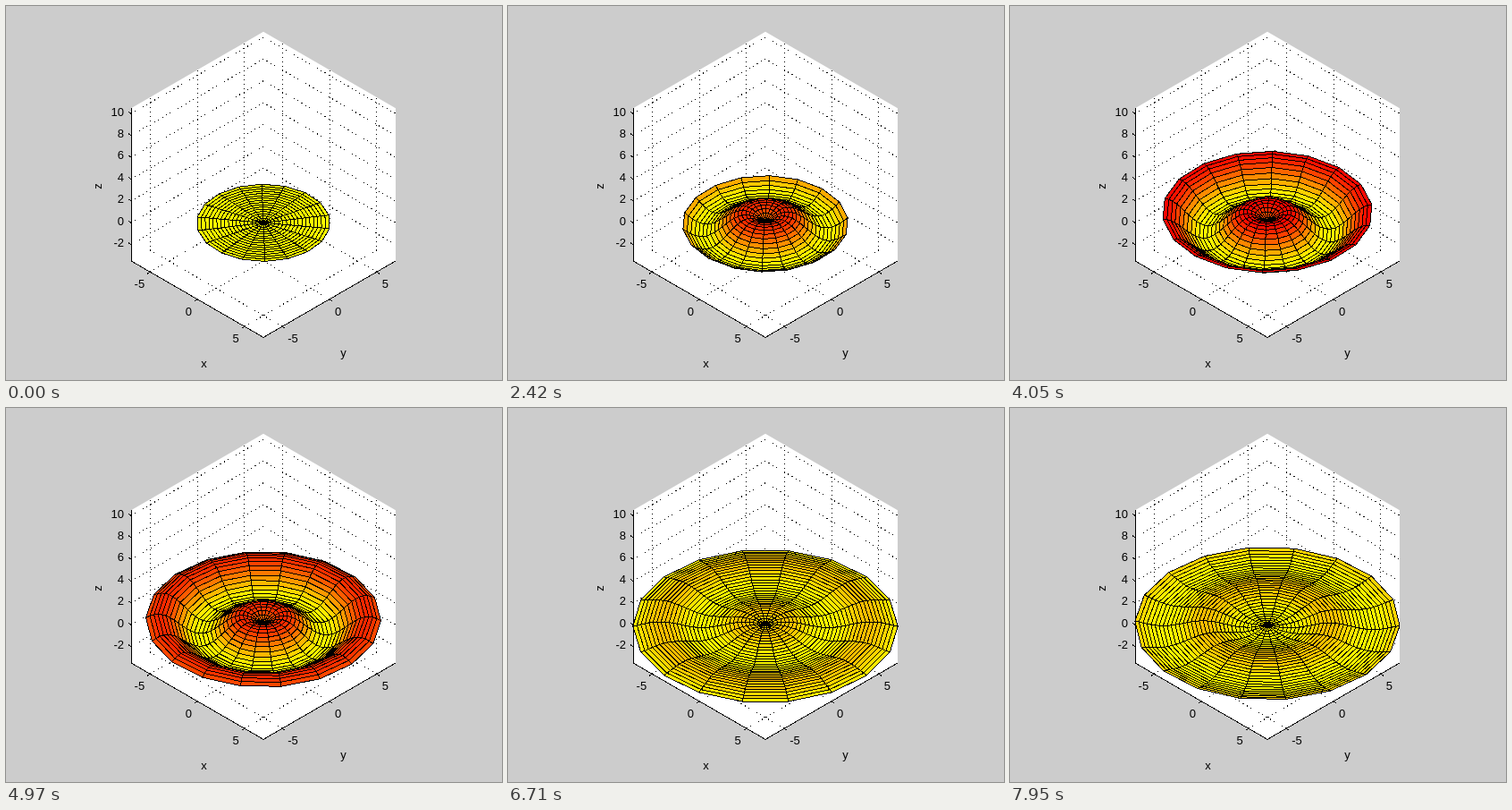
An HTML page that plays this animation: 555x418 px, repeating every 8000 ms.

```html
<!DOCTYPE html>
<html lang="en">
<head>
<meta charset="utf-8">
<title>Rippling disc</title>
<style>
html, body { margin: 0; width: 100%; height: 100%; overflow: hidden; background: #ccc; }
svg { display: block; width: 100vw; height: 100vh; }
text { font: 13px "Liberation Sans", Arial, sans-serif; }
.line { fill: none; stroke: #000; shape-rendering: crispEdges; }
.grid { stroke-dasharray: 1 4; }
#surface { stroke: #000; stroke-width: 1; stroke-linejoin: bevel; shape-rendering: crispEdges; }
</style>
</head>
<body>
<svg viewBox="0 0 555 418">
  <rect width="555" height="418" fill="#ccc"/>
  <g id="axes"></g>
  <g id="surface"></g>
</svg>
<script>
const LOOP = 8000, SECTORS = 18, STEP = 0.3;
const CX = 288, CY = 242.3, UNIT = 14.95, SIN_EL = 0.577, COS_EL = 0.816;
const LIM = 7, Z_MIN = -3.5, Z_MAX = 10.5;
// Mesh rotation in degrees, as [tick, angle]
const TURN = [[0, -1.5], [17, 45], [31, 83.1], [52, 142.9], [76, 199.6], [87, 230], [104, 274.4]];

// u: right on screen, v: towards the viewer along the floor
const project = (u, v, z) => [CX + UNIT * u, CY + UNIT * (SIN_EL * v - COS_EL * z)];
const world = (x, y, z) => project((x + y) * Math.SQRT1_2, (x - y) * Math.SQRT1_2, z);
const coords = p => p[0].toFixed(1) + ',' + p[1].toFixed(1);
const poly = (...pts) => pts.map(coords).join(' ');
const line = (cls, ...pts) => `<polyline class="line ${cls}" points="${poly(...pts)}"/>`;
const label = (s, x, y, anchor = 'middle', extra = '') =>
  `<text x="${x}" y="${y}" text-anchor="${anchor}" ${extra}>${s}</text>`;
const tick = ([x, y], dx, dy) => line('', [x, y], [x + dx, y + dy]);

function drawAxes() {
  const L = LIM, left = world(-L, -L, Z_MIN), front = world(L, -L, Z_MIN), right = world(L, L, Z_MIN);
  const leftTop = world(-L, -L, Z_MAX);
  const hull = [left, front, right, world(L, L, Z_MAX), world(-L, L, Z_MAX), leftTop];
  let out = `<polygon fill="#fff" points="${poly(...hull)}"/>`;
  for (const k of [-5, 0, 5]) {
    out += line('grid', world(k, -L, Z_MIN), world(k, L, Z_MIN), world(k, L, Z_MAX));
    out += line('grid', world(L, k, Z_MIN), world(-L, k, Z_MIN), world(-L, k, Z_MAX));
    const px = world(k, -L, Z_MIN), py = world(L, k, Z_MIN);
    out += tick(px, -3, 2) + tick(py, 3, 2);
    out += label(k, px[0] - 6, px[1] + 18, 'end') + label(k, py[0] + 6, py[1] + 18, 'start');
  }
  for (let z = -2; z <= 10; z += 2) {
    const p = world(-L, -L, z);
    out += line('grid', p, world(-L, L, z), world(L, L, z));
    out += tick(p, -3, -2) + label(z, 132, p[1] + 2.2, 'end');
  }
  out += line('', leftTop, left, front, right);
  out += label('x', 221.5, 404) + label('y', 377.5, 392);
  out += label('z', 107, 201.5, 'middle', 'transform="rotate(-90 107 201.5)"');
  document.getElementById('axes').innerHTML = out;
}

function turnAt(n) {
  let i = 1;
  while (i < TURN.length - 1 && n > TURN[i][0]) i++;
  const [n0, a0] = TURN[i - 1], [n1, a1] = TURN[i];
  return (a0 + (a1 - a0) * (n - n0) / (n1 - n0)) * Math.PI / 180;
}

function drawSurface(n) {
  const phase = Math.PI * n / 95;
  const radius = 7.5 - 2.5 * Math.cos(phase), amp = Math.sin(phase);
  const rings = Math.round(radius / STEP), turn = turnAt(n);
  const height = r => amp * Math.sin(r);
  const faces = [];
  for (let i = 0; i < rings; i++) {
    const r0 = radius * i / rings, r1 = radius * (i + 1) / rings;
    const z0 = height(r0), z1 = height(r1), z = (z0 + z1) / 2;
    const green = Math.round(255 * (1 - (z + Math.abs(amp)) / 2));
    const fill = `rgb(255,${Math.max(0, Math.min(255, green))},0)`;
    for (let j = 0; j < SECTORS; j++) {
      const a0 = turn + 2 * Math.PI * j / SECTORS, a1 = a0 + 2 * Math.PI / SECTORS;
      const at = (r, a, h) => project(r * Math.sin(a), -r * Math.cos(a), h);
      const v = -(r0 + r1) / 4 * (Math.cos(a0) + Math.cos(a1));
      faces.push({
        near: COS_EL * v + SIN_EL * z,
        svg: `<polygon fill="${fill}" points="${poly(at(r0, a0, z0), at(r1, a0, z1), at(r1, a1, z1), at(r0, a1, z0))}"/>`
      });
    }
  }
  faces.sort((a, b) => a.near - b.near);
  document.getElementById('surface').innerHTML = faces.map(f => f.svg).join('');
}

let shown = -1;
function update() {
  const n = Math.floor((performance.now() - start) % LOOP * 0.013 + 0.1);
  if (n !== shown) drawSurface(shown = n);
  requestAnimationFrame(update);
}

drawAxes();
const start = performance.now();
update();
</script>
</body>
</html>
```
